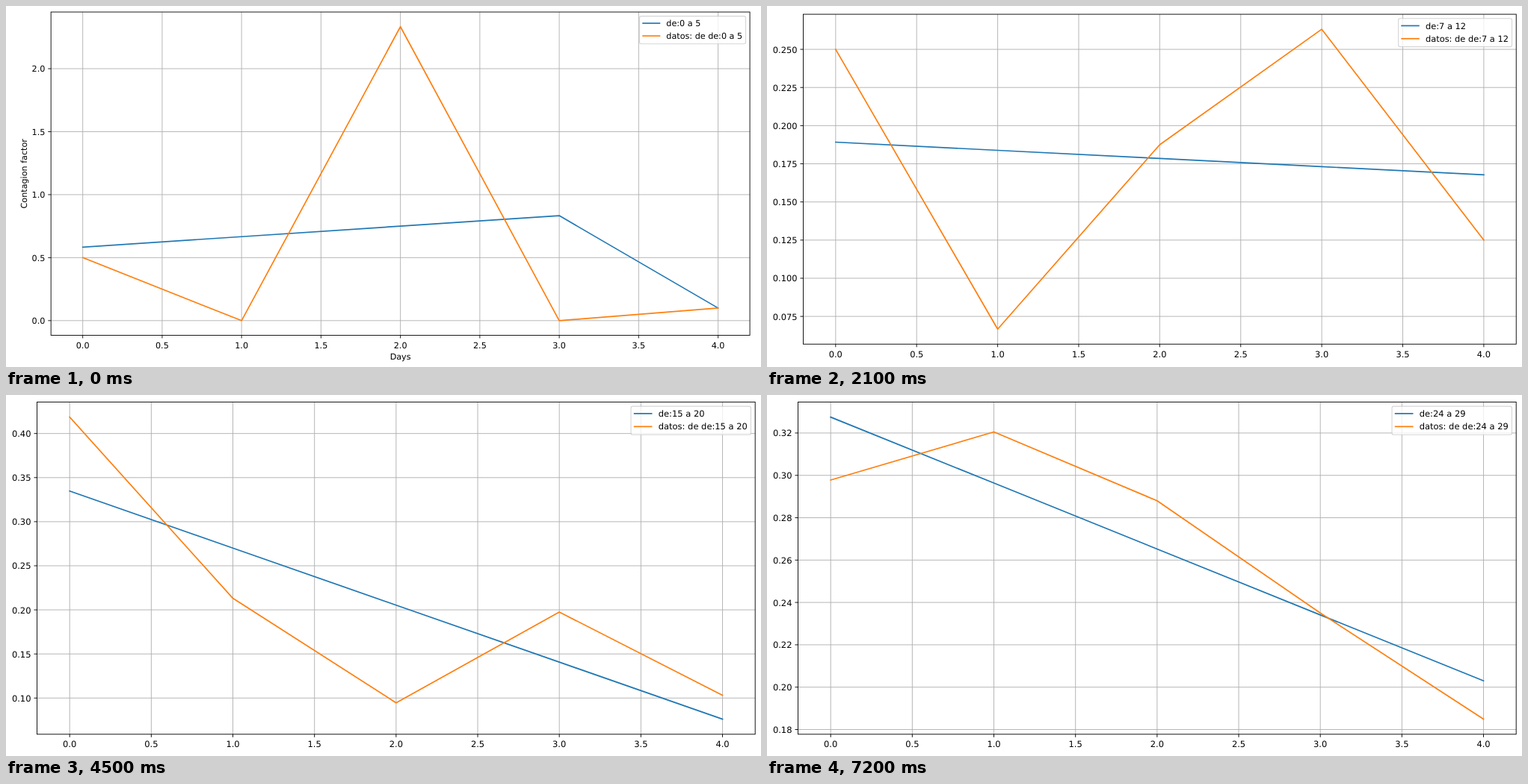
An HTML page for the animation above (7500 ms loop, 1010 px wide and 484 px high).

```html
<!DOCTYPE html>
<html lang="es">
<head>
<meta charset="utf-8">
<title>Contagion factor</title>
<style>
  html, body { margin: 0; width: 100%; height: 100%; overflow: hidden; background: #fff; }
  svg { display: block; width: 100vw; height: 100vh; }
  text { font: 10px "DejaVu Sans", sans-serif; text-rendering: geometricPrecision; }
  .grid { stroke: #b0b0b0; stroke-width: .8; }
  .axis { stroke: #000; stroke-width: .8; fill: none; }
  .curve { fill: none; stroke-width: 1.5; stroke-linejoin: round; stroke-linecap: square; }
  .model { stroke: #1f77b4; }
  .data { stroke: #ff7f0e; }
  .box { fill: #fff; stroke: #ccc; opacity: .8; }
  .mid { text-anchor: middle; }
  .end { text-anchor: end; }
</style>
</head>
<body>
<svg id="stage" viewBox="0 0 1010 484"></svg>
<script>
const STAGE_W = 1010, STAGE_H = 484, STEP_MS = 300, SPAN = 5;
// Plot lengths are in points; each figure is scaled to fit the stage.
const W = 837, H = 388.08, PAD = 7.2, PAD_RIGHT = 6.8, TICK = 3.5, MARGIN = 0.05;
const BEARING = 0.3;

const rates = [
  .5, 0, 7 / 3, 0, 1 / 10, 1 / 11, 0, 1 / 4, 1 / 15, 3 / 16,
  5 / 19, 1 / 8, 2 / 27, 3 / 29, 11 / 32, 18 / 43, 13 / 61, 7 / 74, 16 / 81, 10 / 97,
  8 / 107, .301, .196, .265, .2978, .3205, .288, .235, .1849
];
const breaks = [4, 21];
const steps = rates.length - SPAN + 1;

const stage = document.getElementById('stage');
const pen = document.createElement('canvas').getContext('2d');
pen.font = '100px "DejaVu Sans", sans-serif';
const textWidth = s => pen.measureText(s).width / 10;

const line = (x1, y1, x2, y2, cls) =>
  `<line x1="${x1}" y1="${y1}" x2="${x2}" y2="${y2}" class="${cls}"/>`;
const text = (x, y, s, cls = '', extra = '') =>
  `<text x="${x}" y="${y}" class="${cls}" ${extra}>${s}</text>`;
const curve = (points, cls) => `<polyline points="${points.join(' ')}" class="curve ${cls}"/>`;
const mean = list => list.reduce((a, b) => a + b, 0) / list.length;

// Least squares line with one common slope and a level shift at each break.
function fit(values, first) {
  const groupOf = i => breaks.filter(b => first + i >= b).length;
  const groups = {};
  values.forEach((_, i) => (groups[groupOf(i)] ||= []).push(i));
  let sxy = 0, sxx = 0;
  for (const ids of Object.values(groups)) {
    const mid = mean(ids);
    for (const i of ids) {
      sxy += (i - mid) * values[i];
      sxx += (i - mid) ** 2;
    }
  }
  return values.map((_, i) => {
    const ids = groups[groupOf(i)];
    return mean(ids.map(j => values[j])) + sxy / sxx * (i - mean(ids));
  });
}

function yTicks(low, high) {
  const raw = (high - low) / 9;
  const power = 10 ** Math.floor(Math.log10(raw));
  const unit = [1, 2, 2.5, 5, 10].find(u => u * power >= raw);
  const size = unit * power;
  const digits = Math.max(1, Math.ceil(-Math.log10(power) - 1e-9) + (unit === 2.5 ? 1 : 0) - (unit === 10 ? 1 : 0));
  const ticks = [];
  for (let n = Math.ceil(low / size); n * size <= high; n++) {
    ticks.push({ value: n * size, label: (n * size).toFixed(digits).replace('-', '\u2212') });
  }
  return ticks;
}

// Places the legend where it hides the fewest points and lines.
function placeLegend(curves, w, h) {
  const anchors = [[1, 0], [0, 0], [0, 1], [1, 1], [1, .5], [0, .5], [.5, 1], [.5, 0], [.5, .5]];
  let best;
  for (const [ax, ay] of anchors) {
    const x = 5 + ax * (W - 10 - w), y = 5 + ay * (H - 10 - h);
    const inside = ([px, py]) => px > x && px < x + w && py > y && py < y + h;
    let cost = 0;
    for (const points of curves) {
      cost += points.filter(inside).length;
      const crosses = points.slice(1).some(([bx, by], i) => {
        const [cx, cy] = points[i];
        for (let t = 0; t <= 1; t += .005) {
          if (inside([cx + (bx - cx) * t, cy + (by - cy) * t])) return true;
        }
        return false;
      });
      if (crosses) cost++;
    }
    if (!best || cost < best.cost) best = { x, y, cost };
  }
  return best;
}

function legend(first, curves) {
  const range = `de:${first} a ${first + SPAN}`;
  const rows = [[range, 'model'], ['datos: de ' + range, 'data']];
  const w = 36 + textWidth(rows[1][0]), h = 33.2;
  const { x, y } = placeLegend(curves, w, h);
  let out = `<rect x="${x}" y="${y}" width="${w}" height="${h}" rx="2" class="box"/>`;
  rows.forEach(([label, cls], i) => {
    const base = y + 12.1 + i * 15.2;
    out += line(x + 4, base - 3.6, x + 24, base - 3.6, 'curve ' + cls) + text(x + 32, base, label);
  });
  return out;
}

function chart(first) {
  const data = rates.slice(first, first + SPAN);
  const model = fit(data, first);
  const all = [...data, ...model];
  const min = Math.min(...all), max = Math.max(...all);
  const extra = (max - min) * MARGIN;
  const low = min - extra, high = max + extra;
  const px = v => (v / 4 + MARGIN) / (1 + 2 * MARGIN) * W;
  const py = v => (high - v) / (high - low) * H;

  const titled = first === 0;
  const ticks = yTicks(low, high);
  const labelW = Math.max(...ticks.map(t => textWidth(t.label))) - BEARING;
  const left = PAD + 2 * TICK + labelW + (titled ? 17.5 : 0);
  const fullW = left + W + PAD_RIGHT, fullH = titled ? 433.3 : 419.7;
  const scale = Math.min(STAGE_W / fullW, STAGE_H / fullH);
  const ox = (STAGE_W - fullW * scale) / 2 + left * scale;
  const oy = (STAGE_H - fullH * scale) / 2 + PAD * scale;

  let grid = '', axes = '';
  for (let v = 0; v <= 4; v += .5) {
    const x = px(v);
    grid += line(x, 0, x, H, 'grid');
    axes += line(x, H, x, H + TICK, 'axis') + text(x, H + 15.4, v.toFixed(1), 'mid');
  }
  for (const { value, label } of ticks) {
    const y = py(value);
    grid += line(0, y, W, y, 'grid');
    axes += line(-TICK, y, 0, y, 'axis') + text(-2 * TICK, y + 3.9, label, 'end');
  }
  axes += `<rect width="${W}" height="${H}" class="axis"/>`;
  if (titled) {
    axes += text(W / 2, H + 29.1, 'Days', 'mid') +
      text(0, 0, 'Contagion factor', 'mid', `transform="translate(-29.2 ${H / 2}) rotate(-90)"`);
  }

  const [modelPts, dataPts] = [model, data].map(list => list.map((v, i) => [px(i), py(v)]));
  return `<g transform="translate(${ox} ${oy}) scale(${scale})">` +
    grid + curve(modelPts, 'model') + curve(dataPts, 'data') + axes +
    legend(first, [modelPts, dataPts]) + '</g>';
}

let shown = -1;
function draw() {
  const step = Math.floor(performance.now() / STEP_MS) % steps;
  if (step !== shown) {
    stage.innerHTML = chart(step);
    shown = step;
  }
  requestAnimationFrame(draw);
}
draw();
</script>
</body>
</html>
```
